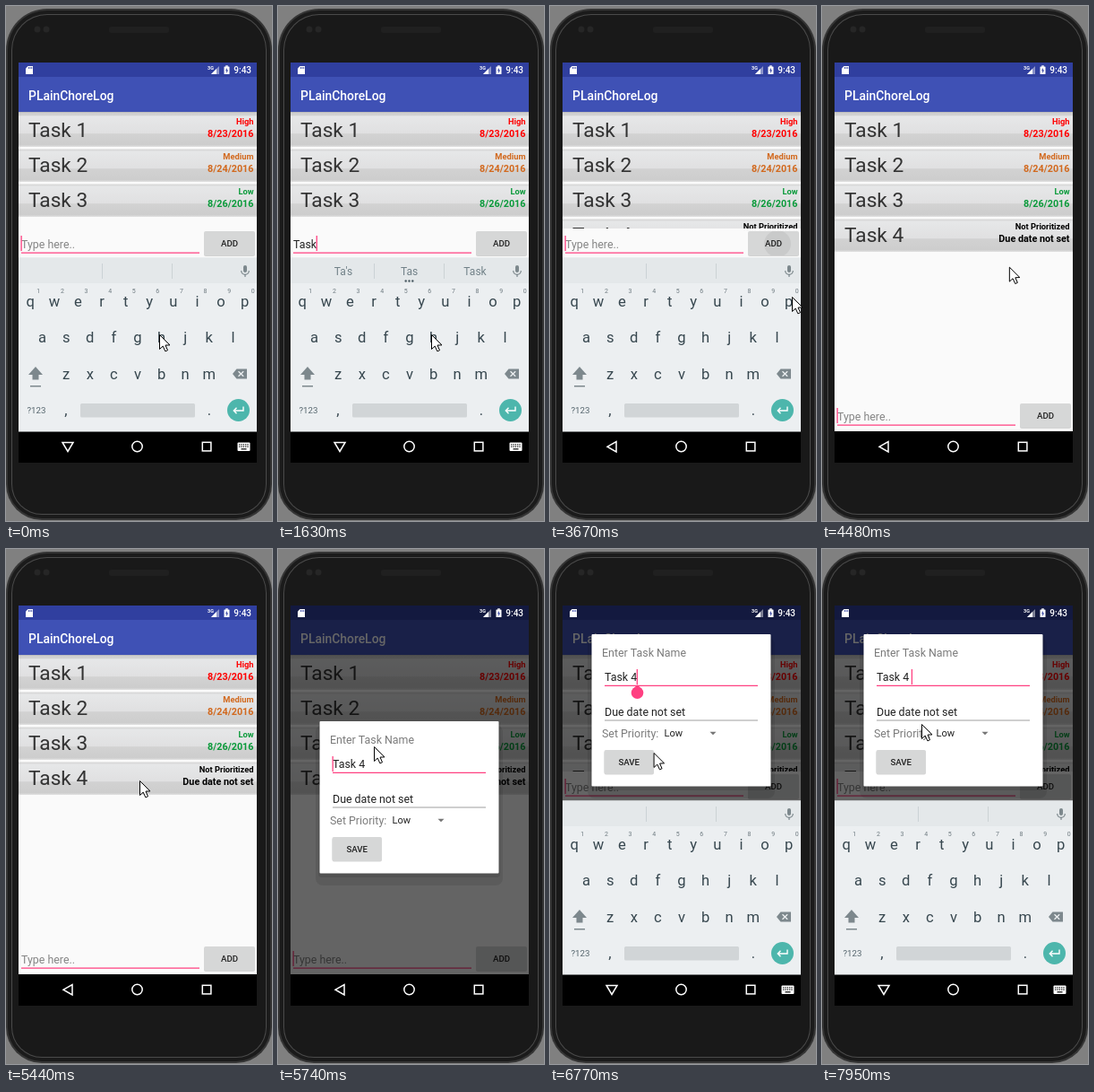
Recreate the animation shown at these times as an HTML page with a canvas. Size 297 by 574 pixels, loop 8000 ms.

```html
<!DOCTYPE html>
<html lang="en">
<head>
<meta charset="utf-8">
<title>Task list demo</title>
<style>
html, body { margin: 0; width: 100%; height: 100%; overflow: hidden; background: #808080; }
canvas { display: block; width: 297px; height: 574px; }
</style>
</head>
<body>
<canvas id="stage"></canvas>
<script>
const W = 297, H = 574, LOOP = 8000;
const PINK = '#ff4081', INK = '#37474f', PAPER = '#fafafa', GREY = '#7d888d';
const canvas = document.getElementById('stage');
const ratio = window.devicePixelRatio || 1;
canvas.width = W * ratio;
canvas.height = H * ratio;
const c = canvas.getContext('2d');

// Moments of the story, in ms.
const KEY_PRESSES = [960, 1360, 1490, 1630, 2030, 2150];
const MOVE = 2700, ADD = 3390, BACK = 3670, HIDE = 3820, OPEN = 5460, TAP = 6260, SPACE = 6915;
const HOLD = 137;

const SUGGESTIONS = {
  'T': ['The', 'T', 'To'],
  'Ta': ["Ta's", 'Ta', 'Take'],
  'Tas': ["Ta's", 'Tas', 'Task'],
  'Task': ["Task's", 'Task', 'Tasks'],
  'Task ': ['and', 'is', 'force']
};
const POINTER = [
  { t: MOVE, x: 171, y: 366 },
  { t: 3300, x: 250, y: 264 },
  { t: 3650, x: 270, y: 324 },
  { t: 5300, x: 149, y: 258 },
  { t: 5570, x: 149, y: 258 },
  { t: 5710, x: 107, y: 220 },
  { t: 6390, x: 117, y: 237 },
  { t: 7280, x: 111, y: 195 }
];
const TASKS = [
  ['Task 1', 'High', '8/23/2016', '#ff0000'],
  ['Task 2', 'Medium', '8/24/2016', '#d2691e'],
  ['Task 3', 'Low', '8/26/2016', '#0a9a3a'],
  ['Task 4', 'Not Prioritized', 'Due date not set', '#000']
];

const clamp = v => Math.min(1, Math.max(0, v));
const smooth = v => v * v * (3 - 2 * v);
const easeOut = v => 1 - (1 - v) ** 1.65;
const typed = t => t >= ADD ? '' : 'Task 4'.slice(0, KEY_PRESSES.filter(p => p <= t).length);
const latest = (t, moments) => Math.max(...moments.filter(m => m <= t));
const caretOn = (t, since) => (t - since) % 1030 < 515;

function pointerAt(t) {
  const next = POINTER.findIndex(p => p.t > t);
  if (next === 0) return POINTER[0];
  if (next < 0) return POINTER[POINTER.length - 1];
  const a = POINTER[next - 1], b = POINTER[next];
  const k = smooth((t - a.t) / (b.t - a.t));
  return { x: a.x + (b.x - a.x) * k, y: a.y + (b.y - a.y) * k };
}

function rect(x, y, w, h, fill, radius = 0) {
  c.fillStyle = fill;
  c.beginPath();
  c.roundRect(x, y, w, h, radius);
  c.fill();
}

function circle(x, y, r, fill) {
  c.fillStyle = fill;
  c.beginPath();
  c.arc(x, y, r, 0, 7);
  c.fill();
}

function arc(x, y, r, end, stroke, width) {
  c.strokeStyle = stroke;
  c.lineWidth = width;
  c.beginPath();
  c.arc(x, y, r, 0, end);
  c.stroke();
}

function shape(path, fill, stroke, width = 1) {
  const p = new Path2D(path);
  if (fill) { c.fillStyle = fill; c.fill(p); }
  if (stroke) { c.strokeStyle = stroke; c.lineWidth = width; c.stroke(p); }
}

function text(str, x, y, size, color, align = 'left', weight = 400) {
  c.font = `${weight} ${size}px Roboto, sans-serif`;
  c.textAlign = align;
  c.fillStyle = color;
  c.fillText(str, x, y);
  return c.measureText(str).width;
}

function gradient(y0, y1, stops) {
  const g = c.createLinearGradient(0, y0, 0, y1);
  stops.forEach(([at, color]) => g.addColorStop(at, color));
  return g;
}

function clipped(x, y, w, h, draw) {
  c.save();
  c.beginPath();
  c.rect(x, y, w, h);
  c.clip();
  draw();
  c.restore();
}

function button(label, x, y, w, h) {
  rect(x, y + 1, w, h, 'rgba(0,0,0,.16)', 2);
  rect(x, y, w, h, '#d6d7d7', 2);
  text(label, x + w / 2, y + h / 2 + 3.5, 9.7, '#212121', 'center', 500);
}

function drawPhone() {
  rect(0, 0, W, H, '#808080');
  ['#353535', '#1b1b1b', '#4a4a4a', '#191919'].forEach((color, i) => {
    const inset = [0, 2, 6, 7][i], r = 46 - inset;
    rect(inset, 3 + inset, W - 2 * inset, 570 - 2 * inset, color, [r, r, r - 6, r - 6]);
  });
  rect(115, 23, 67, 7, '#202020', 3);
  circle(35, 26, 3.5, '#262626');
  circle(45, 26, 3.5, '#262626');
}

function drawList(bottom, count) {
  clipped(14, 118, 266, bottom - 118, () => {
    TASKS.slice(0, count).forEach(([name, priority, due, color], i) => {
      const y = 118 + 39 * i;
      rect(14, y, 266, 39, gradient(y, y + 39, [[0, PAPER], [.05, PAPER], [.08, '#d6d6d6'], [.14, '#e6e7e8'],
        [.62, '#e0e0e1'], [.63, '#d2d2d2'], [.94, '#cdcdcd'], [1, '#e2e2e2']]));
      text(name, 25, y + 28, 22.7, '#333');
      text(priority, 276.5, y + 14, 9.3, color, 'right', 700);
      text(due, 276.5, y + 28, 10.8, color, 'right', 700);
    });
    rect(14, 118, 266, 4, gradient(118, 122, [[0, 'rgba(0,0,0,.28)'], [1, 'rgba(0,0,0,0)']]));
  });
}

function drawEntry(y, value, caret, pressed) {
  const width = value ? text(value, 17, y + 4.5, 12.4, '#212121') : 0;
  if (!value) text('Type here..', 17, y + 4.5, 12.4, '#858585');
  rect(17, y + 9.5, 199, 1.3, PINK);
  if (caret) rect(16.5 + width, y - 9, 1.3, 17, PINK);
  button('ADD', 221, y - 14, 57, 27);
  if (pressed) clipped(221, y - 14, 57, 27, () => circle(254, y, 15, 'rgba(0,0,0,.06)'));
}

function drawStatusIcons() {
  shape('M24.5 67H30V76H22V69.5Z', '#fff');
  for (let i = 0; i < 3; i++) rect(25 + i * 1.7, 68, .8, 2, '#303f9f');
  text('3G', 225, 71, 5.5, '#fff', 'left', 700);
  shape('M238 67V76H229Z', 'rgba(255,255,255,.45)');
  shape('M235 70V76H229Z', '#fff');
  rect(243.5, 67.5, 6, 8.5, '#fff', .6);
  rect(245.2, 66.3, 2.6, 1.5, '#fff');
  shape('M247 68.7L245 72.2H246.3L246 75L248.2 71.4H246.8Z', '#303f9f');
  text('9:43', 274, 75, 10, '#fff', 'right', 500);
}

function drawKeyboard(offset, shade, words) {
  c.save();
  c.translate(0, offset);
  rect(14, 280.5, 266, 194, '#eceff1');
  rect(14, 280.5, 266, 28.5, '#e4e8ea');
  [107, 185].forEach(x => rect(x, 287, 1, 17, '#cbd2d5'));
  words.forEach((word, i) => text(word, 73 + i * 73.5, 300, 12, '#718188', 'center'));
  if (words.length) [-1, 0, 1].forEach(i => circle(146.5 + i * 3.8, 306.5, 1.2, '#4c5c64'));

  rect(265, 289, 4, 8, GREY, 2);
  arc(267, 295, 4.3, Math.PI, GREY, 1.2);
  rect(266.4, 299, 1.2, 3, GREY);

  ['qwertyuiop', 'asdfghjkl', 'zxcvbnm'].forEach((keys, row) => [...keys].forEach((key, i) => {
    const x = 147 + 26.6 * (i - (keys.length - 1) / 2), y = 334.5 + 40.7 * row;
    text(key, x, y, 16.6, INK, 'center');
    if (!row) text((i + 1) % 10, x + 9, y - 15, 7, '#6f7b81', 'center');
  }));

  shape('M33 402L41 411H36.5V416.5H29.5V411H25Z', GREY);
  rect(27, 423, 12, 1.5, GREY);
  shape('M253 410L257.5 404.5H269V415.5H257.5Z', GREY);
  shape('M259.5 407.2L265.2 412.8M265.2 407.2L259.5 412.8', null, '#eceff1', 1.3);

  text('?123', 34, 454, 9.7, '#56666e', 'center');
  text(',', 67, 456, 16.6, INK, 'center');
  rect(83, 443, 128, 15.5, '#d1d5d7', 1.5);
  text('.', 227, 456, 16.6, INK, 'center');
  circle(259.5, 450.5, 12.5, '#4db6ac');
  shape('M265 446.5V451H254.5M257.5 447.8L254.3 451L257.5 454.2', null, '#fff', 1.4);
  c.restore();

  if (shade) {
    rect(14, 280.5 + offset, 266, 230, `rgba(0,0,0,${shade})`);
    rect(14, 474, 266, 35, `rgba(0,0,0,${shade})`);
  }
}

function drawNavIcons(keyboardUp) {
  if (keyboardUp) {
    shape('M63 486.5H75L69 496.5Z', null, '#fff', 1.5);
    rect(258.5, 486.5, 14, 9.5, '#fff', 1);
    for (let i = 0; i < 10; i++) rect(260.2 + (i % 5) * 2.3, 488.2 + Math.floor(i / 5) * 2.3, 1.2, 1.2, '#000');
    rect(262.5, 493.2, 6, 1.2, '#000');
  } else {
    shape('M74 485.5V497L64 491.2Z', null, '#fff', 1.5);
  }
  arc(146.5, 491, 5.7, 7, '#fff', 1.5);
  c.strokeRect(219.3, 486.3, 9.6, 9.6);
}

function drawDialog(top, alpha, value, caret, caretAt, handle) {
  c.save();
  c.globalAlpha = alpha;
  c.translate(0, top);
  rect(42, 4, 209, 179, 'rgba(0,0,0,.09)', 8);
  rect(45, 0, 203, 174, 'rgba(0,0,0,.1)', 4);
  rect(46.5, 0, 200, 169.5, '#fff', 1);
  text('Enter Task Name', 58, 24.5, 12.4, '#7b7b7b');
  text(value, 61, 52, 12.4, '#212121');
  rect(61, 56.7, 171, 1.3, PINK);
  if (caret) rect(60.5 + c.measureText(value.slice(0, caretAt)).width, 39, 1.3, 17, PINK);
  text('Due date not set', 61, 90.5, 12.4, '#212121');
  rect(61, 95.5, 171, 1, '#a0a0a0');
  text('Set Priority:', 58, 115, 12.4, '#7b7b7b');
  text('Low', 127.5, 114, 11.1, '#212121');
  shape('M178.5 108.7H185.5L182 112.3Z', '#757575');
  button('SAVE', 60.5, 129, 55.5, 26.5);
  if (handle) {
    circle(97.5, 65.2, 6.8, PINK);
    shape('M97.5 56.5L102.6 61H92.4Z', PINK);
  }
  c.restore();
}

function drawPointer({ x, y }) {
  c.save();
  c.translate(x + .5, y + .5);
  shape('M0 0V16L3.7 12.6L6.4 18.4L9 17.2L6.5 11.6L11.5 11.4Z', '#fff', '#000');
  c.restore();
}

function drawScreen(t, held) {
  const rise = easeOut(clamp((held - TAP) / (2 * HOLD)));
  const opening = clamp((held - OPEN + 20) / (2 * HOLD));
  const beforeHide = t < HIDE;
  const keyboardUp = beforeHide || rise > 0;
  const entryY = keyboardUp ? 265 : 457;
  const focusTime = Math.min(t, OPEN + HOLD);
  const entryCaret = caretOn(focusTime, latest(focusTime, [0, ...KEY_PRESSES, ADD]));

  rect(14, 63, 266, 411, PAPER);
  drawList(entryY - 17, t < ADD ? 3 : 4);
  drawEntry(entryY, typed(t), entryCaret, t >= ADD && beforeHide);
  rect(14, 63, 266, 16, '#303f9f');
  rect(14, 79, 266, 39, '#3f51b5');
  text('PLainChoreLog', 25, 104.5, 13.9, '#fff', 'left', 500);
  if (opening) rect(14, 63, 266, 411, `rgba(0,0,0,${.6 * opening})`);
  drawStatusIcons();

  rect(14, 474, 266, 35, '#000');
  const words = SUGGESTIONS[typed(t - 120)] || [];
  if (keyboardUp) drawKeyboard(beforeHide ? 0 : 132 * (1 - rise), beforeHide ? 0 : 1 - rise, words);
  drawNavIcons(t < BACK || rise > 0);

  if (opening) {
    const value = t < SPACE ? 'Task 4' : 'Task 4 ';
    const caret = caretOn(t, latest(t, [OPEN, TAP, SPACE]));
    drawDialog(192 - 97 * rise, opening, value, caret, t < TAP ? 0 : value.length, t >= TAP && t < SPACE);
  }
}

function draw(t) {
  const held = t < MOVE ? t : t - (t - MOVE) % HOLD;
  c.setTransform(ratio, 0, 0, ratio, 0, 0);
  drawPhone();
  clipped(14, 63, 266, 446, () => drawScreen(t, held));
  drawPointer(pointerAt(held));
}

const start = performance.now();
function loop() {
  draw((performance.now() - start) % LOOP);
  requestAnimationFrame(loop);
}
loop();
</script>
</body>
</html>
```
